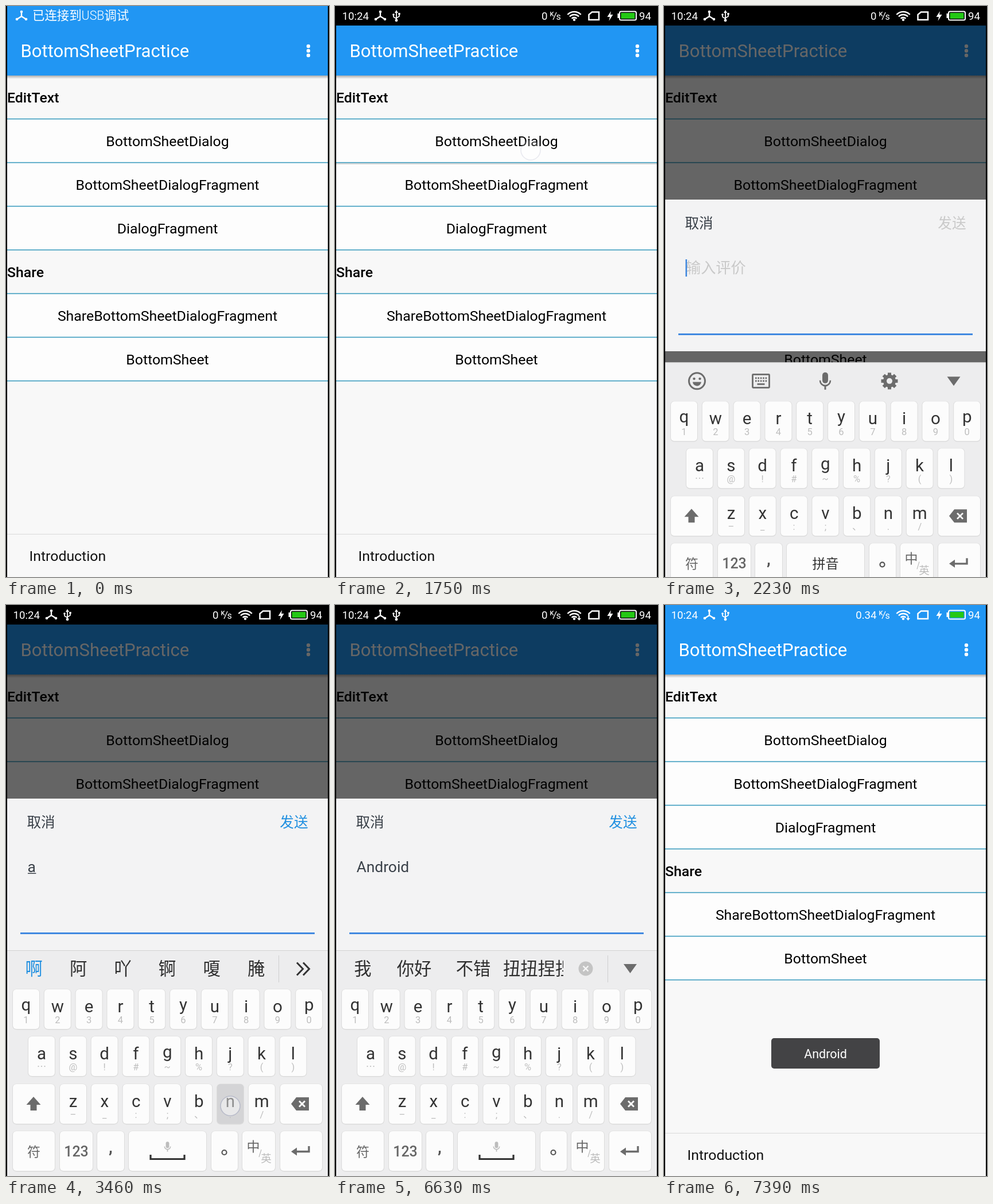
An HTML page with a canvas for the animation above (8 s loop, 563x994 px).

```html
<!DOCTYPE html>
<html lang="en">
<head>
<meta charset="utf-8">
<title>BottomSheetPractice</title>
<style>
html, body { margin: 0; height: 100%; overflow: hidden; background: #000; }
canvas { display: block; width: 100vw; height: 100vh; }
</style>
</head>
<body>
<canvas id="stage" width="563" height="994"></canvas>
<script>
const W = 563, H = 994, LOOP = 8000;
const ctx = document.getElementById('stage').getContext('2d');
const FONT = 'Roboto, "Noto Sans CJK SC", "Noto Sans CJK", sans-serif';
const BLUE = '#2196f3', ACCENT = '#1f8fe0', INK = '#3a4149', ICON = '#6c6c6c';

const clamp = v => Math.min(1, Math.max(0, v));
const ramp = (t, a, b) => clamp((t - a) / (b - a));
const easeOut = p => 1 - (1 - p) ** 3;
const easeInOut = p => p * p * (3 - 2 * p);
const within = (t, a, b) => t >= a && t < b;

function text(s, x, y, size, color, align = 'left', weight = 400) {
  ctx.font = `${weight} ${size}px ${FONT}`;
  ctx.textAlign = align;
  ctx.fillStyle = color;
  ctx.fillText(s, x, y);
}
function rect(x, y, w, h, color) {
  ctx.fillStyle = color;
  ctx.fillRect(x, y, w, h);
}
function round(x, y, w, h, r, color, stroke) {
  ctx.beginPath();
  ctx.roundRect(x, y, w, h, r);
  paint(color, stroke);
}
function circle(x, y, r, color, stroke) {
  ctx.beginPath();
  ctx.arc(x, y, r, 0, Math.PI * 2);
  paint(color, stroke);
}
function path(points, color, stroke) {
  ctx.beginPath();
  for (let i = 0; i < points.length; i += 2) ctx.lineTo(points[i], points[i + 1]);
  if (!stroke) ctx.closePath();
  paint(color, stroke);
}
function paint(color, stroke) {
  if (stroke) {
    ctx.lineWidth = stroke;
    ctx.strokeStyle = color;
    ctx.stroke();
  } else {
    ctx.fillStyle = color;
    ctx.fill();
  }
}
function layer(alpha, dx, dy, draw) {
  if (alpha <= 0) return;
  ctx.save();
  ctx.globalAlpha *= alpha;
  ctx.translate(dx, dy);
  draw();
  ctx.restore();
}
function clipped(x, y, w, h, draw) {
  ctx.save();
  ctx.beginPath();
  ctx.rect(x, y, w, h);
  ctx.clip();
  draw();
  ctx.restore();
}

// Typed text and the candidates offered with it
const STAGES = [
  { at: 0, value: '' },
  { at: 2960, value: 'a', words: '啊阿吖锕嗄腌' },
  { at: 3520, value: 'an', words: '安按案暗岸俺' },
  { at: 4230, value: 'and', words: ['安定', '安的', '暗淡', '安德'] },
  { at: 4710, value: 'andr', words: ['安当然', 'Android', 'Tamrel', '爱'] },
  { at: 6130, value: 'Android', done: true }
];
const CURSOR_ON = [[2150, 2840], [2960, 3460], [3520, 3930], [4230, 5210], [5730, 6630]];
const TOUCHES = [
  { from: 1520, to: 1690, x: 341, y: 251 },
  { from: 2840, to: 2980, x: 62, y: 790, key: 'a' },
  { from: 3460, to: 3580, x: 391, y: 872, key: 'n' },
  { from: 4170, to: 4290, x: 172, y: 790, key: 'd' },
  { from: 4650, to: 4770, x: 199, y: 708, key: 'r' },
  { from: 6010, to: 6160, x: 217, y: 638 },
  { from: 6820, to: 7060, x: 520, y: 375 }
];

function drawApp(t) {
  rect(0, 0, W, H, '#f8f8f8');
  const shadow = ctx.createLinearGradient(0, 121, 0, 127);
  shadow.addColorStop(0, 'rgba(0,0,0,.3)');
  shadow.addColorStop(1, 'rgba(0,0,0,0)');
  rect(0, 121, W, 6, shadow);
  rect(0, 0, W, 121, BLUE);
  text('BottomSheetPractice', 25.5, 89, 31.06, '#fff');
  for (const y of [70, 78, 86]) circle(527, y, 3.2, '#fff');

  const rows = ['#EditText', 'BottomSheetDialog', 'BottomSheetDialogFragment', 'DialogFragment',
    '#Share', 'ShareBottomSheetDialogFragment', 'BottomSheet'];
  rows.forEach((label, i) => {
    const y = 121 + i * 76, heading = label[0] === '#';
    if (!heading) rect(0, y, W, 76, '#fdfdfd');
    if (heading) text(label.slice(1), 2, y + 47, 24.84, '#000', 'left', 500);
    else text(label, 281.5, y + 123 - 76 + 76 - 76, 24.84, '#000', 'center');
  });
  rows.forEach((_, i) => rect(0, 195.8 + i * 76, W, 1.6, '#3a9bbd'));
  if (within(t, 1520, 1850)) rect(0, 273.4, W, 2.4, 'rgba(0,0,0,.14)');
  rect(0, 919, W, 1, '#dadada');
  text('Introduction', 40.5, 966, 24.84, '#111');
}

function branchIcon(x, y) {
  for (const [dx, dy] of [[0, -7], [-8, 6], [8, 6]]) {
    path([x, y + 1, x + dx, y + dy], '#fff', 2.4);
    circle(x + dx, y + dy, 2.3, '#fff');
  }
}
function usbIcon(x, y) {
  path([x, y - 7, x, y + 8], '#fff', 1.8);
  path([x - 5, y - 2, x - 5, y + 2, x, y + 5], '#fff', 1.6);
  path([x + 5, y - 3, x + 5, y + 1, x, y + 4], '#fff', 1.6);
  path([x - 3, y - 5, x, y - 10, x + 3, y - 5], '#fff');
  circle(x, y + 8, 2.4, '#fff');
  circle(x - 5, y - 2, 1.8, '#fff');
  rect(x + 3.3, y - 5, 3.4, 3.4, '#fff');
}
function wifiIcon(x, y, busy) {
  for (const r of [6, 11, 16]) {
    ctx.beginPath();
    ctx.arc(x, y + 9, r, -Math.PI * .76, -Math.PI * .24);
    paint('#fff', 2.4);
  }
  circle(x, y + 7, 2.2, '#fff');
  if (busy) {
    rect(x + 7.5, y + 2, 2, 5, '#fff');
    path([x + 5, y + 6, x + 12, y + 6, x + 8.5, y + 10], '#fff');
  }
}

function drawStatus(t) {
  const out = easeInOut(ramp(t, 990, 1300));
  clipped(0, 0, W, 34, () => {
    layer(1 - out, 0, -34 * out, () => {
      branchIcon(27, 17);
      text('已连接到USB调试', 46, 24, 21.4, '#fff', 'left', 300);
    });
    layer(out, 0, 34 * (1 - out), () => {
      text('10:24', 12.5, 24, 18.64, '#fff');
      branchIcon(79, 17);
      usbIcon(107, 17);
      text(t < 7200 ? '0' : '0.34', 370.5, 24, 18.64, '#fff', 'right');
      text('K', 374.5, 18, 11, '#fff', 'left', 500);
      path([380, 24, 386, 11], '#fff', 1.3);
      text('s', 385.5, 24, 16, '#fff');
      wifiIcon(417, 17, t >= 6250);
      path([448, 10.5, 460, 10.5, 460, 24, 442.5, 24, 442.5, 15, 448, 10.5, 450, 10.5], '#fff', 2.5);
      path([481, 9, 474.5, 19, 479, 19, 477.5, 26, 484.5, 15, 480, 15], '#fff');
      round(496, 9.5, 29, 15, 2.5, '#fff', 2);
      rect(492.5, 13, 2.5, 8, '#fff');
      rect(498.5, 12, 24, 10, '#24c814');
      text('94', 530, 24, 18.64, '#fff');
    });
  });
}

function drawSheet(t, stage) {
  rect(0, 337, W, 264, '#f3f3f4');
  text('取消', 36.5, 387, 24.6, INK);
  text('发送', 526.5, 387, 24.6, stage.value ? ACCENT : '#c9c9c9', 'right');
  ctx.font = `400 26.4px ${FONT}`;
  const width = ctx.measureText(stage.value).width;
  if (stage.value) {
    text(stage.value, 37.5, 465, 26.4, INK);
    if (!stage.done) rect(38, 466.5, width, 1.5, INK);
  } else {
    text('输入评价', 38, 465, 26.2, '#c9c9c9');
  }
  if (CURSOR_ON.some(([a, b]) => within(t, a, b))) rect(37.5 + width, 441, 2.6, 30, '#3f87de');
  rect(25, 570, 513, 3, '#4189e0');
}

function micIcon(x, y, s, color) {
  round(x - 5 * s, y - 15 * s, 10 * s, 19 * s, 5 * s, color);
  ctx.beginPath();
  ctx.arc(x, y - 1 * s, 9 * s, 0, Math.PI);
  paint(color, 2.6 * s);
  path([x, y + 8 * s, x, y + 15 * s], color, 3 * s);
}

function drawTools() {
  const y = 633.5;
  circle(57.5, y, 14, ICON, 3);
  circle(52.5, y - 4, 2.2, ICON);
  circle(62.5, y - 4, 2.2, ICON);
  ctx.beginPath();
  ctx.arc(57.5, y + 1, 7.5, .1, Math.PI - .1);
  paint(ICON);
  round(154.5, y - 11.5, 29, 23, 1, ICON, 2.8);
  for (let i = 0; i < 5; i++) {
    rect(159 + i * 4.4, y - 6.5, 2.6, 2.8, ICON);
    rect(159 + i * 4.4, y - 1.5, 2.6, 2.8, ICON);
  }
  rect(162.5, y + 4, 13, 2.8, ICON);
  micIcon(281, y, 1, ICON);
  for (let i = 0; i < 8; i++) {
    const a = i * Math.PI / 4, c = Math.cos(a), s = Math.sin(a);
    path([393 + c * 8, y + s * 8, 393 + c * 14.5, y + s * 14.5], ICON, 6);
  }
  circle(393, y, 8, ICON, 6);
  path([493.5, y - 7.5, 516.5, y - 7.5, 505, y + 8.5], ICON);
}

function drawCandidates(stage) {
  const base = 644, ink = '#2f2f2f';
  rect(475, 610, 1, 47, '#cfcfcf');
  if (stage.done) {
    text('我', 48.5, base, 30.3, ink, 'center');
    text('你好', 138, base, 30.3, ink, 'center');
    text('不错', 241, base, 30.3, ink, 'center');
    clipped(285, 602, 113, 66, () => text('扭扭捏捏', 293, base, 30.3, ink));
    circle(437, 633, 12.5, '#c4c4c4');
    path([432.5, 628.5, 441.5, 637.5], '#f6f6f6', 2.4);
    path([441.5, 628.5, 432.5, 637.5], '#f6f6f6', 2.4);
    path([503, 625, 526, 625, 514.5, 641], ICON);
    return;
  }
  for (const x of [507, 518]) path([x, 622.5, x + 10.5, 633.5, x, 644.5], '#333', 3);
  if (typeof stage.words === 'string') {
    [...stage.words].forEach((w, i) => text(w, 48.7 + i * 77.5, base, 30.3, i ? ink : ACCENT, 'center'));
    return;
  }
  clipped(10, 602, 465, 66, () => {
    let x = 31;
    stage.words.forEach((w, i) => {
      text(w, x, base, 30.6, i ? ink : ACCENT);
      x += ctx.measureText(w).width + 40.5;
    });
  });
}

function keyCap(x, y, w, pressed) {
  round(x - 1, y - .6, w + 2, 71, 7, '#dcdcdc');
  round(x, y, w, 69, 6, pressed ? '#d4d4d6' : '#fcfcfc');
}

function drawKeys(t) {
  const pressed = TOUCHES.find(p => p.key && within(t, p.from, p.to));
  const rows = [
    { x: 12, y: 669, keys: 'qwertyuiop', subs: '1234567890' },
    { x: 39, y: 751, keys: 'asdfghjkl', subs: '⋯@!#~%?()' },
    { x: 94, y: 834, keys: 'zxcvbnm', subs: '–_:;、./' }
  ];
  for (const { x, y, keys, subs } of rows) {
    [...keys].forEach((k, i) => {
      const left = x + i * 54.8, mid = left + 23;
      keyCap(left, y, 46, pressed && pressed.key === k);
      text(k, mid, y + ('qpyg'.includes(k) ? 36.5 : 40), 29.5, '#333', 'center');
      text([...subs][i], mid, y + 59, 16.5, '#bdbdbd', 'center');
    });
  }
  const wide = [[12, 73], [94, 57], [159, 47], [214, 135], [358, 46], [412, 57], [478, 73]];
  for (const [x, w] of wide) keyCap(x, 916, w);
  keyCap(12, 834, 73);
  keyCap(478, 834, 73);

  path([48, 856, 60.5, 870, 53.5, 870, 53.5, 880, 42.5, 880, 42.5, 870, 35.5, 870], ICON);
  path([497, 868.5, 506, 857, 528, 857, 528, 880, 506, 880], ICON);
  path([511, 863.5, 521, 873.5], '#fff', 2.8);
  path([521, 863.5, 511, 873.5], '#fff', 2.8);

  text('符', 48.5, 959.5, 23, '#666', 'center');
  text('123', 122.5, 960, 25, '#666', 'center', 500);
  text(',', 182.5, 953, 28, '#555', 'center', 700);
  circle(380.5, 953, 4, '#555', 2.2);
  text('中', 431, 950.5, 23, '#666', 'center');
  path([441, 961, 445, 948], '#bbb', 1.2);
  text('英', 453.5, 970, 18.5, '#bbb', 'center');
  path([528, 942, 528, 951.5, 500, 951.5], ICON, 3.4);
  path([497, 951.5, 507, 944.5, 507, 958.5], ICON);

  const swap = ramp(t, 3000, 3200);
  layer(1 - swap, 0, 0, () => text('拼音', 281.5, 959.5, 23, '#333', 'center', 500));
  layer(swap, 0, 0, () => {
    micIcon(281.5, 943, .58, '#bdbdbd');
    path([252, 957, 252, 964.5, 311, 964.5, 311, 957], '#333', 3.2);
  });
}

function drawKeyboard(t, stage) {
  rect(0, 601, W, 393, '#ededee');
  rect(0, 601, W, 1, '#d2d2d2');
  if (stage.value) drawCandidates(stage);
  else drawTools();
  drawKeys(t);
}

function drawToast() {
  round(187, 754, 189, 53, 5, 'rgba(48,48,50,.9)');
  text('Android', 281.5, 789, 21.5, '#fff', 'center');
}

function drawTouches(t) {
  for (const p of TOUCHES) {
    if (t < p.from) continue;
    layer(1 - ramp(t, p.to, p.to + 110), 0, 0, () => {
      circle(p.x, p.y, 16.5, 'rgba(255,255,255,.45)');
      circle(p.x, p.y, 17, 'rgba(150,155,185,.45)', 1.6);
    });
  }
}

function draw(t) {
  const stage = STAGES.filter(s => t >= s.at).pop();
  const leave = ramp(t, 6960, 7240);
  const bar = Math.min(ramp(t, 1640, 1740), 1 - leave);
  const dim = .6 * Math.min(ramp(t, 1790, 2020), 1 - leave);

  drawApp(t);
  rect(0, 0, W, H, `rgba(0,0,0,${dim})`);
  rect(0, 0, W, 34, `rgba(0,0,0,${bar})`);
  drawStatus(t);

  if (within(t, 1800, 7115)) {
    const exit = ramp(t, 6960, 7110);
    const rise = t < 2110 ? 393 + 264 * (1 - easeOut(ramp(t, 1800, 2060))) : 0;
    layer(1 - exit, 0, rise + 198 * exit, () => drawSheet(t, stage));
  }
  if (within(t, 2060, 7200)) {
    const enter = 393 * (1 - easeOut(ramp(t, 2060, 2330)));
    const drop = 393 * ramp(t, 6950, 7165) ** 1.0;
    layer(1, 0, enter + drop, () => drawKeyboard(t, stage));
  }
  layer(ramp(t, 7060, 7380), 0, 0, drawToast);
  drawTouches(t);
  rect(0, 0, 2, H, '#000');
  rect(561, 0, 2, H, '#000');
}

const start = performance.now();
function frame() {
  draw((performance.now() - start) % LOOP);
  requestAnimationFrame(frame);
}
frame();
</script>
</body>
</html>
```
